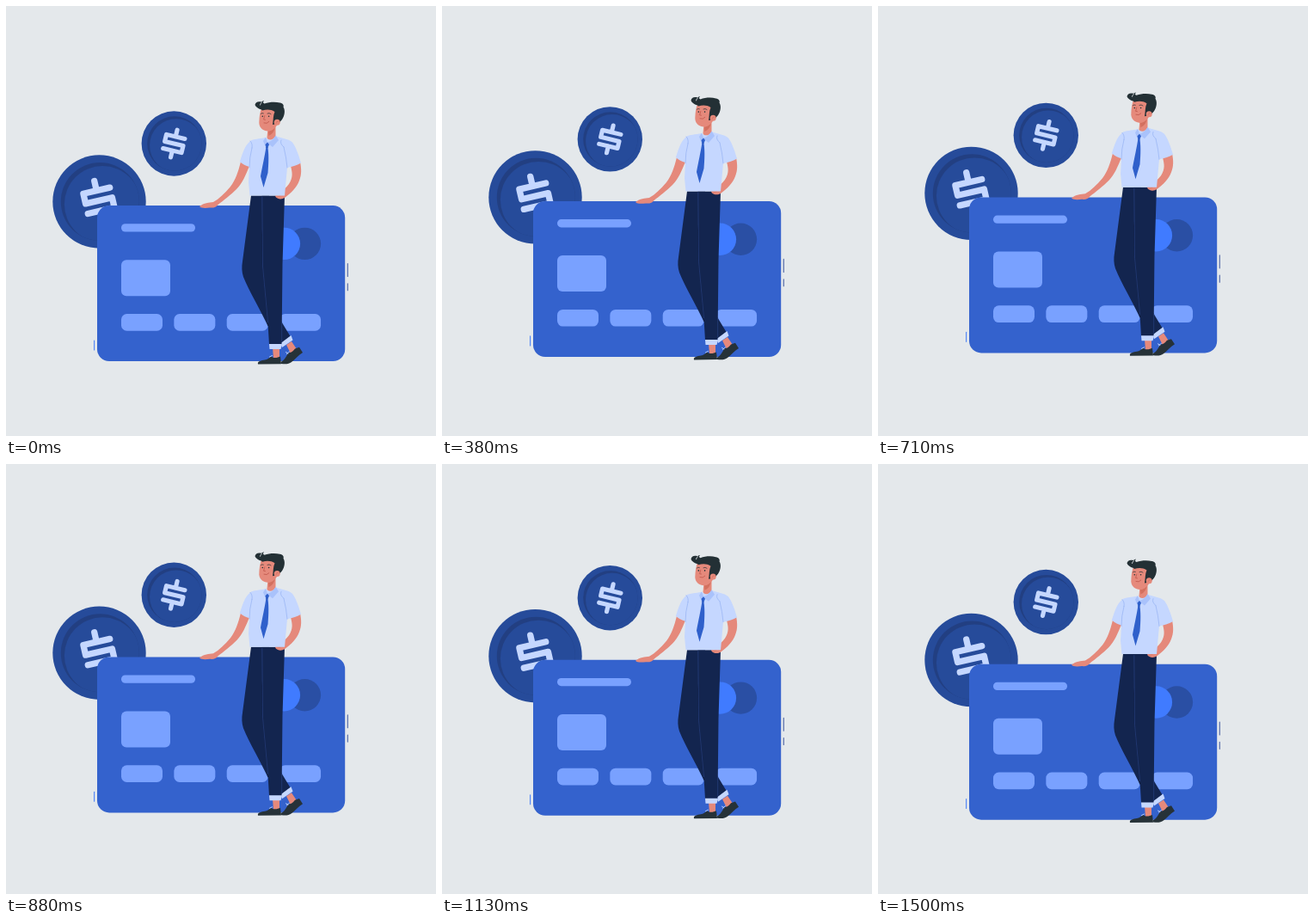
Recreate the animation shown at these times as an HTML page with a canvas. Size 500 px wide and 500 px high, loop 1540 ms.

```html
<!DOCTYPE html>
<html lang="en">
<head>
<meta charset="utf-8">
<title>Bank card</title>
<style>
  html, body { margin: 0; width: 100%; height: 100%; overflow: hidden; background: #e4e8eb; }
  canvas { display: block; width: 500px; height: 500px; }
</style>
</head>
<body>
<canvas id="stage"></canvas>
<script>
const SIZE = 500, LOOP = 1540, STEPS = 37;
const LOWEST = 35.8, TRAVEL = 10.5, START = 0.68;

const C = {
  back: '#e4e8eb', card: '#3462cd', pale: '#79a1ff', bright: '#407bff', disc: '#2a4fa4',
  coin: '#264b9a', coinShade: '#223f82', shirt: '#c5d7ff', collar: '#a9c2fb', seam: '#8eacf0',
  tie: '#2f60cb', pants: '#13254f', pantsShade: '#0e1b3d', pantsLine: '#2c478c',
  skin: '#e5897b', skinShade: '#d3705f', hair: '#233035', shoe: '#263238'
};

const canvas = document.getElementById('stage');
const ctx = canvas.getContext('2d');
const ratio = window.devicePixelRatio || 1;
canvas.width = canvas.height = SIZE * ratio;

function fill(color, path) {
  ctx.fillStyle = color;
  ctx.fill(new Path2D(path));
}

function line(color, width, path) {
  ctx.strokeStyle = color;
  ctx.lineWidth = width;
  ctx.stroke(new Path2D(path));
}

function circle(color, x, y, r) {
  ctx.fillStyle = color;
  ctx.beginPath();
  ctx.arc(x, y, r, 0, Math.PI * 2);
  ctx.fill();
}

function box(color, x, y, w, h, r) {
  ctx.fillStyle = color;
  ctx.beginPath();
  ctx.roundRect(x, y, w, h, r);
  ctx.fill();
}

function coin(x, y, r, signX, signY, degrees) {
  circle(C.coin, x, y, r);
  circle(C.coinShade, x + r * 0.015, y, r * 0.84);
  ctx.save();
  ctx.beginPath();
  ctx.arc(x + r * 0.015, y, r * 0.84, 0, Math.PI * 2);
  ctx.clip();
  circle(C.coin, x + r * 0.07, y + r * 0.055, r * 0.82);
  ctx.restore();

  ctx.save();
  ctx.translate(signX, signY);
  ctx.rotate(degrees * Math.PI / 180);
  ctx.scale(r / 37.7, r / 37.7);
  line(C.shirt, 5.1, 'M11-8.3H-11V0H11V8.3H-11M0-8.3V-16.3M0 8.3V16.3');
  ctx.restore();
}

function card() {
  box(C.card, 106, 232.1, 288.2, 181, 14);
  box(C.pale, 134, 253.2, 86, 9.3, 4.6);
  box(C.pale, 134, 295.2, 57, 42, 6);
  for (let i = 0; i < 4; i++) box(C.pale, 134 + i * 61.35, 358, 48, 19.7, 6.5);
  circle(C.disc, 347.4, 276.4, 18.7);
  circle(C.bright, 323.4, 276.4, 18.7);
  line('#4a62a5', 1.1, 'M397.3 299.5V314.5M397.3 322.8V330.8');
  line('#4c82f5', 1.1, 'M102.6 389V400');
}

function legs() {
  fill(C.skin, 'M326 394L332 390L338 399L331 404Z M310 397H318V410H311Z');
  fill(C.shoe, 'M320 416L319.500 414C324 412 326 407 328.500 403C331 404 334 401 336 398.500L341 396.800L345 403C340 406 336 411 332 414C329 416.500 325 416.500 320 416Z');
  fill(C.shoe, 'M293 416.500C292 413 297 412 301 411.500C304 411 306 409 308.500 407.500C311 410 316 409 319 407.500L320 416.200Z');
  line(C.shirt, 0.9, 'M306.500 408L309.500 406.500M326.500 404.500L329.500 402M325.500 402.500L328 404');

  fill(C.pants, 'M285 220.500H306L313 355L330.500 384L321 392L304 371C294 350 283 332 276 315C274 309 274 303 275 297Z');
  fill(C.pantsShade, 'M297 260L298 302L304 371L308 376L305 300Z');
  fill(C.shirt, 'M331.500 383L333.500 388.500L321 397L319.500 392Z');
  fill(C.pants, 'M297.500 220.500H324L321.500 300L320.500 394H306L304.500 368L298.500 303Z');
  line(C.pantsLine, 0.6, 'M297.800 222L298.500 303L304.500 368M320.700 368V390');
  fill(C.shirt, 'M306 393H321L319.500 399H306.500Z');
}

function arms() {
  fill(C.skin, 'M273 181C270 193 267 202 261 210C254 218 248 224 241 228C236 228.500 230 229 225 233C227 235.500 233 235 237 234.500C241 235 245 234 246 231.500C253 226 262 219 268 213C275 206 279 196 283 186Z');
  fill(C.skin, 'M331 186C333 194 334 199 329 207C326 211 323 214 318 215.500C314 216 312.500 219 313.500 222C316 225 321 225 324 223C332 217 338 211 341 203C344 196 343.500 189 342 181Z');
  line(C.skinShade, 0.5, 'M314.500 219.500L319 218.500M315 222L319 221');
}

function torso() {
  fill(C.skin, 'M304.500 142L313.500 136V153C311 158 305 158 303.500 153Z');
  fill(C.skinShade, 'M305 145.500Q310 145 313 140Q312 148 305.500 151Z');
  fill(C.shirt, 'M302 153C294 155 288 154 284 157C277 163 275 172 271.800 181C275 184 279 186 283 187L282 205L283.500 220.500H324L324.500 215L327 188C333 187 339 185 343 182.500C340 172 337 164 333 158.500C328 154 320 154 313.500 151C311 156 306 157 302 153Z');
  line(C.seam, 0.6, 'M286 165Q283 176 283 188M323 164Q326 176 327 188M284 157Q287 160 286 165M320 156Q318 160 323 164');
  fill(C.collar, 'M302 152.500L299 157L301.500 163L304 159.500L310 164L317 156L313.500 150.500Q310 157 304 158.500Z');
  fill(C.tie, 'M304 158.500L306 161L304.500 164.500C306 175 305 188 304.500 194L299.500 211L296 198C298 187 301 174 302.300 164.500L301.500 161Z');
  line('#244fae', 0.5, 'M302.300 164.500H304.500');
}

function head() {
  fill(C.skin, 'M298 117C295 123 294.500 129 294.300 136C294.500 142 300 146 305.500 145.500C310 145 314 141 316 137L321 120Z');
  fill(C.hair, 'M289.500 115C290 111.500 293 110.500 297 111.500C298 111 298.500 110.200 300.300 110.300C298.500 111.500 298.500 112.500 300.500 113.500C306 111.500 313 111 318.500 112.500C322 113 323.500 115.500 322.500 117.500C325 121 324 128 321 132L317 136.500L310 138C311 132 310.500 127 312.500 123C308 120 303 120 298 121.500C297 119.500 292 120 289.500 115Z');
  line(C.back, 0.8, 'M295.500 115Q295.500 113 297.500 112');
  circle(C.skin, 315.2, 135.3, 3.5);
  line(C.skinShade, 0.6, 'M313.800 136.500Q314.500 133.500 317 134');
  circle(C.hair, 298.3, 128.2, 0.8);
  circle(C.hair, 305.6, 128.2, 0.8);
  line(C.hair, 0.7, 'M296.300 125.300Q297.500 124 299.300 124.800M304 125Q306 123.800 308 125.500');
  line('#b94f45', 0.7, 'M300.800 127.500L299.600 132L301.500 132.300M300 136Q303.500 137.500 305.800 134.500');
}

function scene() {
  coin(108.5, 227.5, 54.2, 108, 226.3, -13);
  coin(195.3, 160, 37.7, 195.3, 160, 13.5);
  card();
  legs();
  arms();
  torso();
  head();
}

// Linear rise and fall, stepped at 24 poses per second.
function lift(time) {
  const tick = Math.floor(time / 10) * 10;
  const step = Math.floor((tick + 4.9) * 0.024);
  const away = Math.abs(step - LOWEST);
  const distance = Math.min(away, STEPS - away);
  return START - TRAVEL * distance / (STEPS / 2);
}

function draw(now) {
  ctx.setTransform(ratio, 0, 0, ratio, 0, 0);
  ctx.fillStyle = C.back;
  ctx.fillRect(0, 0, SIZE, SIZE);
  ctx.lineCap = ctx.lineJoin = 'round';
  ctx.translate(0, lift(now % LOOP));
  scene();
}

const origin = performance.now();
function loop() {
  draw(performance.now() - origin);
  requestAnimationFrame(loop);
}
loop();
</script>
</body>
</html>
```
